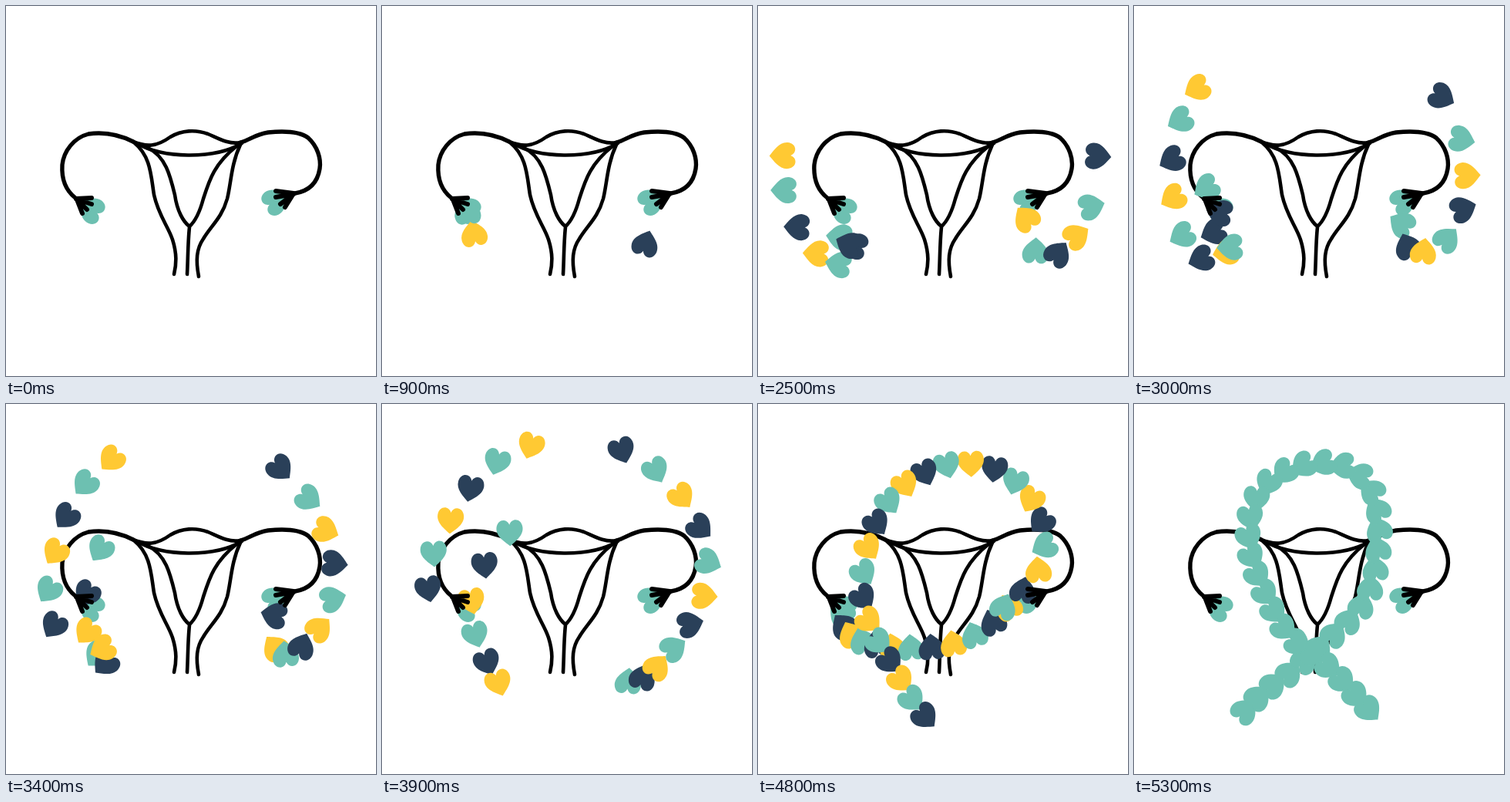
These frames come from a looping animation (480x480 px, 5.4 s). An HTML page:

```html
<!DOCTYPE html>
<html lang="en">
<head>
<meta charset="utf-8">
<title>Hearts forming a ribbon</title>
<style>
  html, body { margin: 0; width: 100%; height: 100%; overflow: hidden; background: #fff; }
  svg { display: block; width: 100vw; height: 100vh; }
  .ink { fill: none; stroke: #000; stroke-width: 4.6; stroke-linecap: round; stroke-linejoin: round; }
  .tube { stroke-width: 5.4; }
  .fringe { stroke-width: 6; }
</style>
</head>
<body>
<svg viewBox="0 0 480 480">
  <defs>
    <path id="heart" d="M0 18C-7 12-18 5-17-6C-15.500-18-3-18.500 0-9.500C3-18.500 15.500-18 17-6C18 5 7 12 0 18Z"/>
    <path id="ring" d="M54 224C58 182 76 155 98 130S143 72 170 61S255 36 293 47S365 78 387 105S428 150 432 197S418 275 397 308S360 355 335 376S275 404 240 400S175 372 153 340S112 270 128 234S160 175 186 162"/>
    <path id="ribbon" d="M143 399C156 385 164 376 180 365C203 350 220 334 240 316C260 298 281 282 295 262C308 243 314 215 316 190C318 165 319 144 311 119C301 93 277 77 250 77C223 76 199 83 178 99C157 115 149 142 149 170C149 194 158 219 170 245C181 268 191 291 209 307C228 321 247 334 264 352L305 397"/>
  </defs>
  <use href="#heart" fill="#6dc0b1" transform="translate(110 264) rotate(120)"/>
  <use href="#heart" fill="#6dc0b1" transform="translate(350 253) rotate(-120)"/>
  <g class="ink">
    <path class="tube" d="M90 249C76 238 72 222 73 206C75 188 88 171 107 166C128 163 147 167 165 176"/>
    <path d="M165 176C182 183 195 183 213 170C228 161 246 160 262 166C274 171 288 180 304 177"/>
    <path class="tube" d="M304 177C316 174 322 167 340 164C360 162 380 162 392 171C404 182 409 198 407 211C404 230 393 240 375 243"/>
    <path d="M172 179C200 197 270 200 306 178"/>
    <path d="M184 184C207 195 213 220 219 245C222 266 230 280 238 286C247 278 252 265 256 250C264 225 270 205 300 181"/>
    <path d="M238 287C236 305 236 330 235 348"/>
    <path d="M166 177C188 195 188 220 192 245C198 272 210 285 216 303C222 322 221 335 218 348"/>
    <path d="M304 180C292 205 292 230 287 250C280 275 266 285 256 302C247 315 246 330 250 351"/>
  </g>
  <g id="hearts"></g>
  <g class="ink fringe">
    <path d="M91 250L111 249M92 251L111 257M92 251L105 264M92 251L99 269"/>
    <path d="M373 243L350 240M373 244L350 248M372 245L356 257M372 245L362 261"/>
  </g>
</svg>
<script>
const LOOP = 5400, STEP = 100, COUNT = 35, RING_COUNT = 23;
const BIRTH = 500, RING = 4300, RIBBON = 5300;
const TEAL = "#6dc0b1", COLORS = ["#2a4059", TEAL, "#ffc933"];
const CENTER = { x: 240, y: 218 };
const DEG = 180 / Math.PI;

const byId = id => document.getElementById(id);
const mix = (a, b, u) => a + (b - a) * u;
const wrap = (angle, low) => ((angle - low) % 360 + 360) % 360 + low;

// Poses are polar around the centre, so hearts sweep rather than cut across.
function polar(x, y, turn) {
  const dx = x - CENTER.x, dy = y - CENTER.y;
  return { angle: Math.atan2(dy, dx) * DEG, radius: Math.hypot(dx, dy), turn };
}
const leftTube = polar(110, 264, 120), rightTube = polar(350, 253, -120);

function ringPose(i) {
  const path = byId("ring");
  const { x, y } = path.getPointAtLength(path.getTotalLength() * i / (RING_COUNT - 1));
  return { ...polar(x, y, -0.25 * (y - 40)), x, y };
}

function ribbonPose(i) {
  const path = byId("ribbon"), f = 1 - i / (COUNT - 1);
  const s = path.getTotalLength() * f;
  const a = path.getPointAtLength(s - 2), b = path.getPointAtLength(s + 2);
  const tilt = -25 * Math.sin(Math.PI * f);
  const turn = Math.atan2(a.x - b.x, b.y - a.y) * DEG + tilt;
  return polar((a.x + b.x) / 2, (a.y + b.y) / 2, turn);
}

const hearts = Array.from({ length: COUNT }, (_, i) => {
  const node = byId("heart").cloneNode();
  node.removeAttribute("id");
  byId("hearts").prepend(node);
  const slot = i < RING_COUNT ? ringPose(i) : null;
  const birth = RING + (i - RING_COUNT + 1) * 40;
  return { node, slot, birth, ribbon: ribbonPose(i), color: COLORS[i % 3] };
});

// Hearts bound for the top travel farthest and leave first.
hearts.slice(0, RING_COUNT)
  .sort((a, b) => a.slot.y - b.slot.y)
  .forEach((heart, k) => {
    heart.birth = BIRTH + 2950 * (k / (RING_COUNT - 1)) ** 0.85;
  });

// Out of the tube: dip down, swing outwards, then climb to the ring.
function fly({ slot, birth }, t) {
  const life = RING - birth, u = (t - birth) / life, swing = life / (RING - BIRTH);
  const left = slot.x < CENTER.x, side = left ? 1 : -1;
  const tube = left ? leftTube : rightTube;
  const sweep = wrap(slot.angle - tube.angle, left ? -150 : -210);
  const dip = 450 * swing * u * (1 - u) ** 3;
  const bulge = 1800 * swing * u * u * (1 - u) ** 3;
  return {
    angle: tube.angle + sweep * u - side * dip,
    radius: mix(tube.radius, slot.radius, u) + bulge,
    turn: slot.turn + side * 180 * (1 - u)
  };
}

// Counter-clockwise into the ribbon.
function gather({ slot, birth, ribbon }, t) {
  const from = slot || leftTube, begin = Math.max(RING, birth);
  const u = 1 - (1 - Math.min(1, (t - begin) / (RIBBON - begin))) ** 2;
  return {
    angle: from.angle + wrap(ribbon.angle - from.angle, -360) * u,
    radius: mix(from.radius, ribbon.radius, u),
    turn: from.turn + wrap(ribbon.turn - from.turn, -180) * u
  };
}

function draw(now) {
  const t = Math.floor(now % LOOP / STEP) * STEP;
  for (const heart of hearts) {
    const visible = t >= heart.birth;
    heart.node.style.display = visible ? "" : "none";
    if (!visible) continue;
    const { angle, radius, turn } = t < RING ? fly(heart, t) : gather(heart, t);
    const x = CENTER.x + radius * Math.cos(angle / DEG);
    const y = CENTER.y + radius * Math.sin(angle / DEG);
    heart.node.setAttribute("transform", `translate(${x} ${y}) rotate(${turn})`);
    heart.node.setAttribute("fill", t >= RIBBON ? TEAL : heart.color);
  }
}

const start = performance.now();
function tick() {
  draw(performance.now() - start);
  requestAnimationFrame(tick);
}
tick();
</script>
</body>
</html>
```
